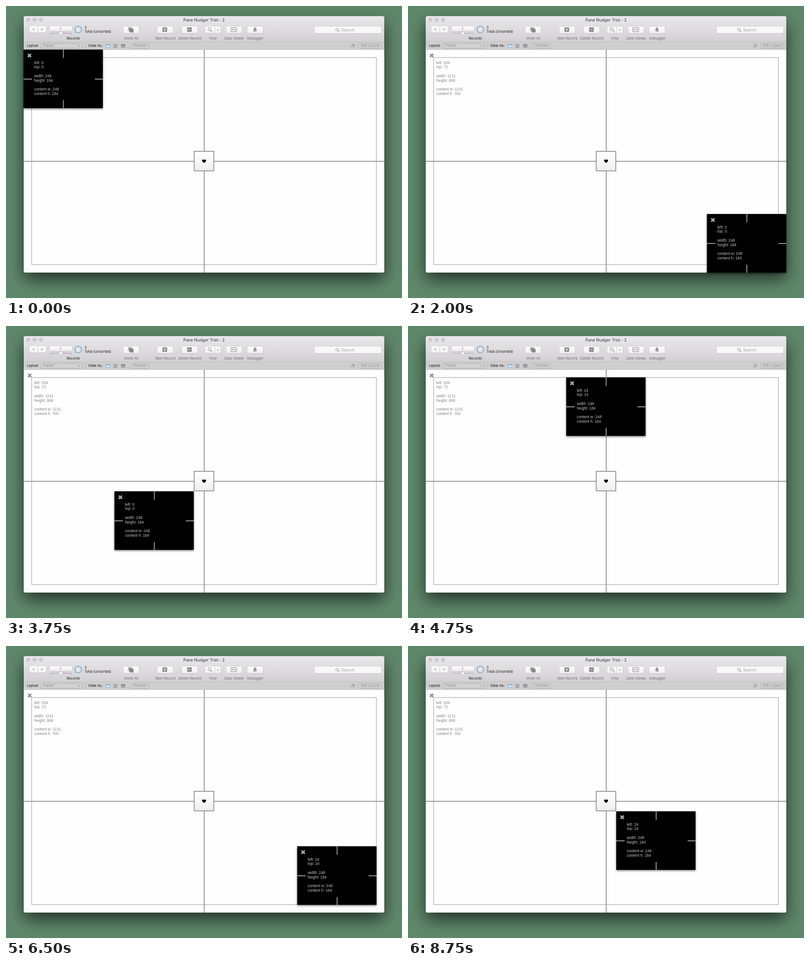
These frames come from a looping animation (871x643 px, 9 s). An HTML page with a canvas:

```html
<!DOCTYPE html>
<html lang="en">
<head>
<meta charset="utf-8">
<title>Window placement</title>
<style>
  html, body { margin: 0; width: 100%; height: 100%; overflow: hidden; background: #5f886b; }
  canvas, svg { position: absolute; left: 0; top: 0; width: 871px; height: 643px; }
  text { white-space: pre; }
  .ui { font-family: Inter, "Open Sans", sans-serif; }
  .info { font-family: "Liberation Sans", Arial, sans-serif; font-size: 8.42px; }
  .serif { font-family: "Liberation Serif", serif; }
  #panel { filter: drop-shadow(0 2px 2px rgba(0, 0, 0, .5)); }
</style>
</head>
<body>
<canvas id="stage" width="871" height="643"></canvas>
<svg id="layer" viewBox="0 0 871 643" xmlns="http://www.w3.org/2000/svg">
  <g id="labels"></g>
  <g id="card"><rect id="panel" width="174.5" height="129"/></g>
</svg>
<script>
const ctx = document.getElementById('stage').getContext('2d');
const labels = document.getElementById('labels');
const card = document.getElementById('card');
const GREY = '#999';

// ---- helpers: canvas shapes ----
function gradient(y0, y1, a, b) {
  const g = ctx.createLinearGradient(0, y0, 0, y1);
  g.addColorStop(0, a);
  g.addColorStop(1, b);
  return g;
}

function rect(x, y, w, h, fill) {
  ctx.fillStyle = fill;
  ctx.fillRect(x, y, w, h);
}

function rounded(x, y, w, h, r, fill, stroke) {
  ctx.beginPath();
  ctx.roundRect(x, y, w, h, r);
  if (fill) { ctx.fillStyle = fill; ctx.fill(); }
  if (stroke) { ctx.strokeStyle = stroke; ctx.lineWidth = 1; ctx.stroke(); }
}

function line(points, color, width = 1) {
  ctx.beginPath();
  points.forEach(([x, y], i) => i ? ctx.lineTo(x, y) : ctx.moveTo(x, y));
  ctx.strokeStyle = color;
  ctx.lineWidth = width;
  ctx.stroke();
}

function circle(x, y, r, fill, stroke, width = 1) {
  ctx.beginPath();
  ctx.arc(x, y, r, 0, Math.PI * 2);
  if (fill) { ctx.fillStyle = fill; ctx.fill(); }
  if (stroke) { ctx.strokeStyle = stroke; ctx.lineWidth = width; ctx.stroke(); }
}

function button(x, y, w, h) {
  rounded(x, y + 0.6, w, h, 3, '#bdbbbd');
  rounded(x, y, w, h, 3, gradient(y, y + h, '#fbfbfb', '#f1f1f1'), '#d0ced0');
}

function lens(x, y, r, color) {
  circle(x, y, r, null, color);
  line([[x + r * .7, y + r * .7], [x + r * 1.9, y + r * 1.9]], color, 1.2);
}

function chevron(x, y, dx, dy, color) {
  const tip = [x + dx, y + dy];
  line([[x - dx - dy * 1.7, y - dy - dx * 1.7], tip, [x - dx + dy * 1.7, y - dy + dx * 1.7]], color, 1.1);
}

// ---- helpers: svg parts ----
function node(parent, name, attrs, content = '') {
  const el = document.createElementNS('http://www.w3.org/2000/svg', name);
  for (const key in attrs) el.setAttribute(key, attrs[key]);
  el.textContent = content;
  parent.appendChild(el);
  return el;
}

function label(content, x, y, fill, anchor = 'middle', size = 7.65, cls = 'ui') {
  node(labels, 'text', { x, y, fill, 'text-anchor': anchor, 'font-size': size, class: cls }, content);
}

// Close mark and the six readings, relative to a top left corner.
function readings(parent, x, y, rows, textColor, markColor) {
  const d = `M${x + 9.5} ${y + 9.5}l7.2 7.2m0 -7.2l-7.2 7.2`;
  node(parent, 'path', { d, stroke: markColor, 'stroke-width': 3.1 });
  return rows.map((row, i) => node(parent, 'text', {
    x: x + 23.2, y: y + 31.6 + 9.81 * (i + Math.floor(i / 2)), fill: textColor, class: 'info'
  }, row));
}

// ---- window ----
function drawFrame() {
  rect(0, 0, 871, 643, '#5f886b');
  ctx.save();
  ctx.shadowColor = 'rgba(0,0,0,.62)';
  ctx.shadowBlur = 36;
  ctx.shadowOffsetY = 15;
  rounded(39, 22.5, 793, 564.5, 4, '#fff');
  ctx.restore();

  ctx.save();
  ctx.beginPath();
  ctx.roundRect(39, 22.5, 793, 564.5, 4);
  ctx.clip();
  rect(39, 22, 793, 57, gradient(22, 79, '#eae8ea', '#d2d0d2'));
  rect(39, 78.5, 793, 1, '#b0aeb0');
  rect(39, 79.5, 793, 17, '#cecece');
  rect(39, 95.5, 793, 1, '#b4b4b4');
  rect(39, 96.5, 793, 491, '#fefefe');
  ctx.restore();
}

function drawToolbar() {
  for (const x of [49, 63, 77]) circle(x, 30.3, 4, '#d0ced0', '#b9b7b9', .8);
  label('Pane Nudger Trial - 2', 435.5, 33.6, '#3a3a3a', 'middle', 9);

  button(51, 43.5, 37.5, 15.5);
  line([[69.8, 43.5], [69.8, 59]], '#d0ced0');
  chevron(60.5, 51.2, -1.2, 0, '#808080');
  chevron(79, 51.2, 1.2, 0, '#808080');

  button(95.5, 43.5, 50, 11.5);
  label('2', 120, 52.2, '#777', 'middle', 7);
  line([[96, 60], [145, 60]], '#b3b1b3', 1.6);
  circle(120.3, 60, 3.3, '#fafafa', '#c2c0c2', .8);
  for (const x of [98.5, 142.5]) rect(x - .5, 63, 1, 1.5, '#a5a3a5');
  circle(159, 51.8, 7.2, '#e6e5e6', '#7db6e2', 2.2);
  label('3', 172.6, 50, '#222', 'start');
  label('Total (Unsorted)', 172.6, 59.4, '#222', 'start');
  label('Records', 148, 73.6, '#222');

  const tools = [[275, 'Show All'], [350, 'New Record'], [404, 'Delete Record'],
    [455, 'Find'], [501.5, 'Data Viewer'], [548, 'Debugger']];
  for (const [x, name] of tools) {
    button(x - 17.5, 44.5, 35, 15.5);
    label(name, x + .3, 73.6, '#707070');
  }
  drawIcons();

  rounded(678.5, 45, 147.5, 16, 3, '#bdbbbd');
  rounded(678.5, 44.5, 147.5, 15.7, 3, '#f8f8f8', '#d0ced0');
  lens(728, 51.8, 2.9, '#929292');
  label('Search', 737, 55.7, '#a2a2a2', 'start', 8.9);
}

function drawIcons() {
  const ink = '#858585';
  rect(268.5, 46.5, 8, 8, '#b5b5b5');
  rect(270.3, 48.3, 8, 8, '#9d9d9d');
  rect(272.3, 50.2, 8.2, 8, ink);

  rect(344.3, 47.2, 10, 9.6, ink);
  rect(346.3, 51.4, 6, 1.2, '#fff');
  rect(348.7, 49, 1.2, 6, '#fff');
  rect(398.5, 47.2, 10, 9.6, ink);
  rect(400.5, 51.4, 6, 1.2, '#fff');

  lens(447.5, 51, 3.4, ink);
  line([[459.5, 44.5], [459.5, 60]], '#d0ced0');
  chevron(466, 52.3, 0, 1, '#8a8a8a');

  rounded(494.5, 47.5, 13, 9, .5, null, ink);
  rect(497, 50.5, 2.5, 2.5, ink);
  rect(501.5, 50, 4, 1, ink);
  rect(501.5, 53, 4, 1, ink);

  for (const dy of [-2, 0.5, 3]) line([[543.5, 52.5 + dy], [551.7, 52.5 + dy]], ink, .8);
  ctx.beginPath();
  ctx.ellipse(547.6, 52.8, 2.8, 3.8, 0, 0, Math.PI * 2);
  ctx.fillStyle = ink;
  ctx.fill();
  circle(547.6, 48.3, 1.6, ink);
  line([[547.6, 50.5], [547.6, 56]], '#e5e5e5', .8);
}

function drawStatusBar() {
  const dim = '#8e8e8e', edge = '#acacac';
  label('Layout:', 46, 90.3, '#111', 'start');
  rounded(76.5, 82.5, 91, 10.5, 2.5, '#d2d2d2', edge);
  label('Parent', 82, 90.3, dim, 'start');
  chevron(160.8, 88, 0, .9, dim);
  for (const x of [174, 268]) rect(x, 82, 1, 12, '#b6b6b6');
  label('View As:', 180.8, 90.3, '#111', 'start');

  rounded(219.5, 84.5, 9, 6.5, .5, '#dce8f2', '#77b2e2');
  rect(219.5, 85, 9, 1.5, '#77b2e2');
  for (let i = 0; i < 4; i++) rect(236, 84 + i * 2.3, 9, 1, '#808080');
  rounded(253.5, 84.5, 8.5, 6.5, .5, null, '#808080');
  rect(253.5, 84.5, 8.5, 2, '#808080');
  rect(253.5, 88.3, 8.5, .8, '#808080');
  for (const x of [256, 259]) rect(x, 85, .8, 6, '#808080');

  rounded(275.5, 82.5, 38, 10.5, 2.5, '#d2d2d2', edge);
  label('Preview', 294.3, 90.3, dim);
  label('A', 758.6, 91, '#777', 'start', 11.5, 'serif');
  label('a', 765.6, 87.2, '#777', 'start', 7, 'serif');
  rounded(775.5, 82.5, 51, 10.5, 2.5, '#d2d2d2', edge);
  label('Edit Layout', 801, 90.3, dim, 'middle', 7.85);
}

function drawContent() {
  ctx.strokeStyle = GREY;
  ctx.lineWidth = 1;
  ctx.strokeRect(56.5, 113.5, 758, 456);
  rect(435, 96.5, 2, 490.5, GREY);
  rect(39, 341, 793, 2, GREY);
  rect(414, 320, 43, 43, gradient(320, 363, '#fff', '#eee'));
  ctx.strokeStyle = GREY;
  ctx.lineWidth = 2;
  ctx.strokeRect(414, 320, 43, 43);

  ctx.beginPath();
  ctx.moveTo(435.7, 346);
  ctx.bezierCurveTo(434.5, 344.3, 431.3, 342.8, 431.3, 340.3);
  ctx.bezierCurveTo(431.3, 337.3, 435, 337.3, 435.7, 339.6);
  ctx.bezierCurveTo(436.4, 337.3, 440.1, 337.3, 440.1, 340.3);
  ctx.bezierCurveTo(440.1, 342.8, 436.9, 344.3, 435.7, 346);
  ctx.fillStyle = '#000';
  ctx.fill();

  readings(labels, 39, 96, ['left: 209', 'top: 72', 'width: 1131', 'height: 806',
    'content w: 1131', 'content h: 700'], '#858585', '#8f8f8f');
}

// ---- card ----
const ticks = [[86.8, 0, 2, 18.5], [86.8, 111.5, 2, 17.5], [0, 64, 18.5, 2], [157, 64, 17.5, 2]];
for (const [x, y, width, height] of ticks) node(card, 'rect', { x, y, width, height, fill: GREY });
const [leftText, topText] = readings(card, 0, 0, ['left: 0', 'top: 0', 'width: 248', 'height: 184',
  'content w: 248', 'content h: 184'], '#c2c2c2', '#aaa');

// Each grid is walked row by row: window edges, around the button, inset margin, around again.
const edges = { x: [38.5, 348, 657.5], y: [96, 277, 458], margin: 0 };
const around = { x: [238.5, 348, 458], y: [190, 277, 364], margin: 0 };
const inset = { x: [56, 348, 640.5], y: [113, 277, 441], margin: 24 };
const tour = [edges, around, inset, { ...around, margin: 24 }];
const STEP = 250;
let shown = -1;

function place(step) {
  const { x, y, margin } = tour[Math.floor(step / 9)];
  const cell = step % 9;
  card.setAttribute('transform', `translate(${x[cell % 3]} ${y[Math.floor(cell / 3)]})`);
  leftText.textContent = 'left: ' + margin;
  topText.textContent = 'top: ' + margin;
}

drawFrame();
drawToolbar();
drawStatusBar();
drawContent();
place(0);

let start;
function tick(now) {
  if (start === undefined) start = now;
  const step = Math.floor((now - start) / STEP) % (tour.length * 9);
  if (step !== shown) place(shown = step);
  requestAnimationFrame(tick);
}
requestAnimationFrame(tick);
</script>
</body>
</html>
```
